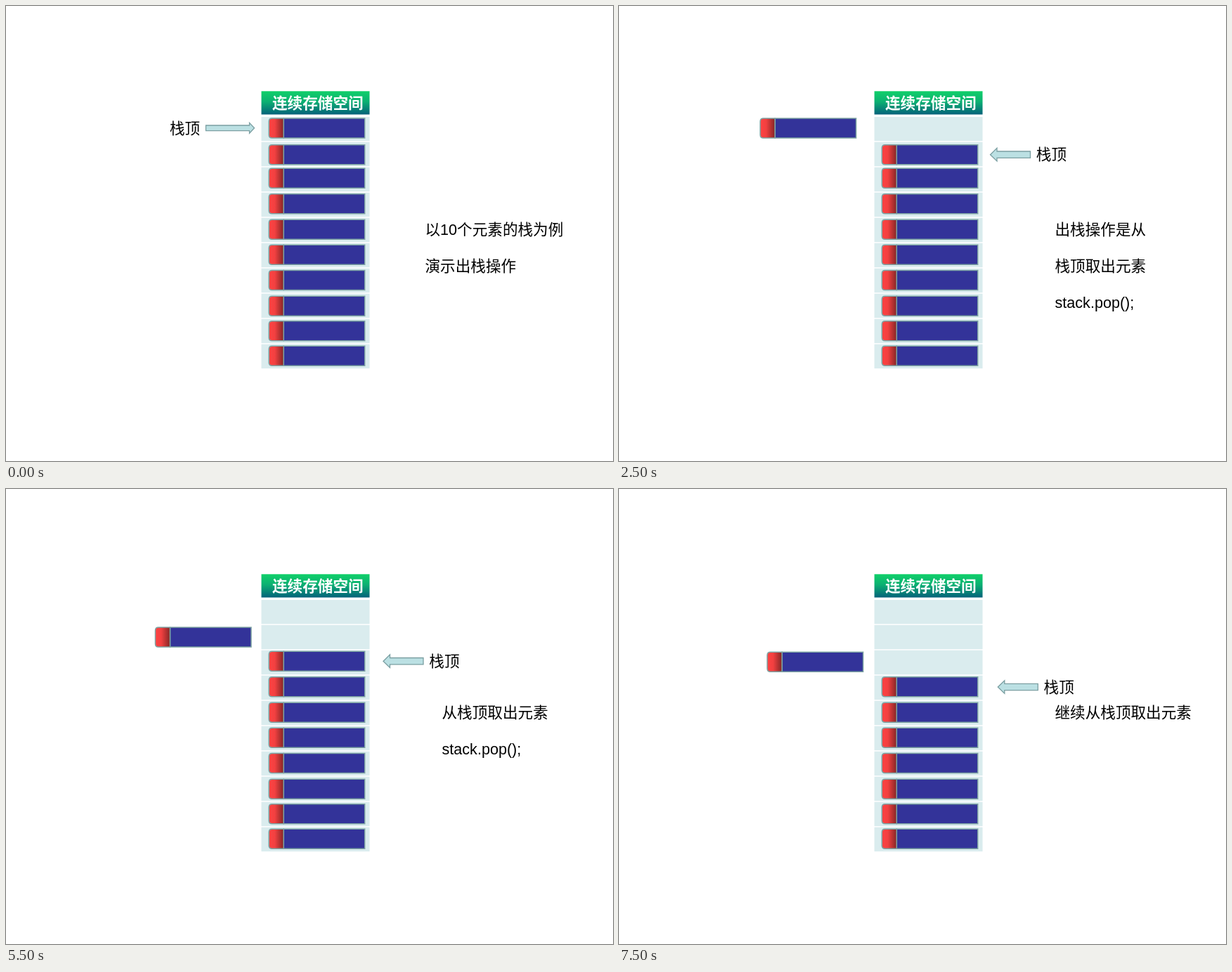
These frames come from a looping animation (864 px wide and 648 px high, 8000 ms). An HTML page:

```html
<!DOCTYPE html>
<html lang="zh-CN">
<head>
<meta charset="utf-8">
<title>出栈演示</title>
<style>
  html, body { margin: 0; width: 100%; height: 100%; overflow: hidden; background: #fff; }
  svg { display: block; width: 864px; height: 648px; }
  text { font: 21.6px "Liberation Sans", "Noto Sans CJK SC", "Noto Sans CJK", sans-serif; font-weight: 300; fill: #000; white-space: pre; }
  .title { font-weight: 700; fill: #fff; }
  .cell { fill: #daecee; }
  .line { stroke: #7da3a3; stroke-width: 1.5; }
  .arrow { fill: #bbe0e3; stroke: #7b9fa2; stroke-width: 1.3; }
</style>
</head>
<body>
<svg viewBox="0 0 864 648">
  <defs>
    <linearGradient id="green" x2="0" y2="1">
      <stop offset="0" stop-color="#10d069"/>
      <stop offset=".45" stop-color="#0cb072"/>
      <stop offset="1" stop-color="#04627a"/>
    </linearGradient>
    <linearGradient id="red">
      <stop offset="0" stop-color="#ff4343"/>
      <stop offset=".4" stop-color="#f24040"/>
      <stop offset="1" stop-color="#842626"/>
    </linearGradient>
    <g id="bar" class="line">
      <path d="M21 0H136.5V28H21Z" fill="#333399"/>
      <path d="M21 0H4.5Q0 0 0 4.5V23.5Q0 28 4.5 28H21Z" fill="url(#red)"/>
    </g>
    <path id="left" class="arrow" d="M0 0L9.5 -9.3V-4.7H57V4.7H9.5V9.3Z"/>
    <path id="right" class="arrow" d="M69 0L62 -7.5V-3.8H0V3.8H62V7.5Z"/>
  </defs>
  <rect x="363.5" y="121.3" width="154" height="33.2" fill="url(#green)"/>
  <text class="title" x="379" y="145.5">连续存储空间</text>
  <g id="cells"></g>
  <g id="bars"></g>
  <use id="popped" href="#bar"/>
  <use id="arrow"/>
  <text id="label">栈顶</text>
  <g id="notes"></g>
</svg>
<script>
const LOOP = 8000;
const barTops = [160, 197.7, 231.3, 267.8, 304.3, 340.2, 376.6, 413.2, 448.7, 484.2];

// Each scene: start time, bars removed, arrow position, popped bar, note position and lines.
const scenes = [
  { at: 0, gone: 0, arrow: [284.5, 173.8], right: true, x: 596.5, lines: ["以10个元素的栈为例", "演示出栈操作"] },
  { at: 500, gone: 0, arrow: [531, 173.8], x: 620.5, lines: ["出栈操作是从", "栈顶取出元素"] },
  { at: 2500, gone: 1, arrow: [528.5, 211.7], out: [201, 160], x: 620.5, lines: ["出栈操作是从", "栈顶取出元素", "stack.pop();"] },
  { at: 4500, gone: 1, arrow: [539.3, 211], x: 620.5, lines: ["继续取出元素"] },
  { at: 5500, gone: 2, arrow: [537, 245.2], out: [212.5, 197], x: 620.5, lines: ["从栈顶取出元素", "stack.pop();"] },
  { at: 6500, gone: 2, arrow: [536, 245.2], x: 620.5, lines: ["从栈顶取出元素", "stack.pop();"] },
  { at: 7500, gone: 3, arrow: [539.3, 282], out: [211, 232.3], x: 620.5, lines: ["继续从栈顶取出元素"] }
];

const byId = id => document.getElementById(id);
const [cells, bars, popped, arrow, label, notes] =
  ["cells", "bars", "popped", "arrow", "label", "notes"].map(byId);

function add(parent, tag, attrs) {
  const el = document.createElementNS("http://www.w3.org/2000/svg", tag);
  for (const key in attrs) el.setAttribute(key, attrs[key]);
  return parent.appendChild(el);
}

function place(el, x, y) {
  el.setAttribute("x", x);
  el.setAttribute("y", y);
}

const show = (el, on) => el.setAttribute("visibility", on ? "visible" : "hidden");

barTops.forEach((y, i) => {
  const top = i ? 157.7 + 36 * i : 158;
  add(cells, "rect", { class: "cell", x: 363.5, y: top, width: 154, height: 192.2 + 36 * i - top });
  add(bars, "use", { href: "#bar", x: 374.2, y });
});

function draw(scene) {
  [...bars.children].forEach((bar, i) => show(bar, i >= scene.gone));
  show(popped, scene.out);
  if (scene.out) place(popped, ...scene.out);

  const [x, y] = scene.arrow;
  arrow.setAttribute("href", scene.right ? "#right" : "#left");
  place(arrow, x, y);
  place(label, scene.right ? x - 51.5 : x + 65.3, y + 7.7);

  notes.replaceChildren();
  scene.lines.forEach((line, i) => {
    add(notes, "text", { x: scene.x, y: 326 + 52 * i }).textContent = line;
  });
}

const start = performance.now();
let current;

function tick() {
  const time = (performance.now() - start) % LOOP;
  const scene = scenes.findLast(s => time >= s.at);
  if (scene !== current) draw(current = scene);
  requestAnimationFrame(tick);
}
tick();
</script>
</body>
</html>
```
